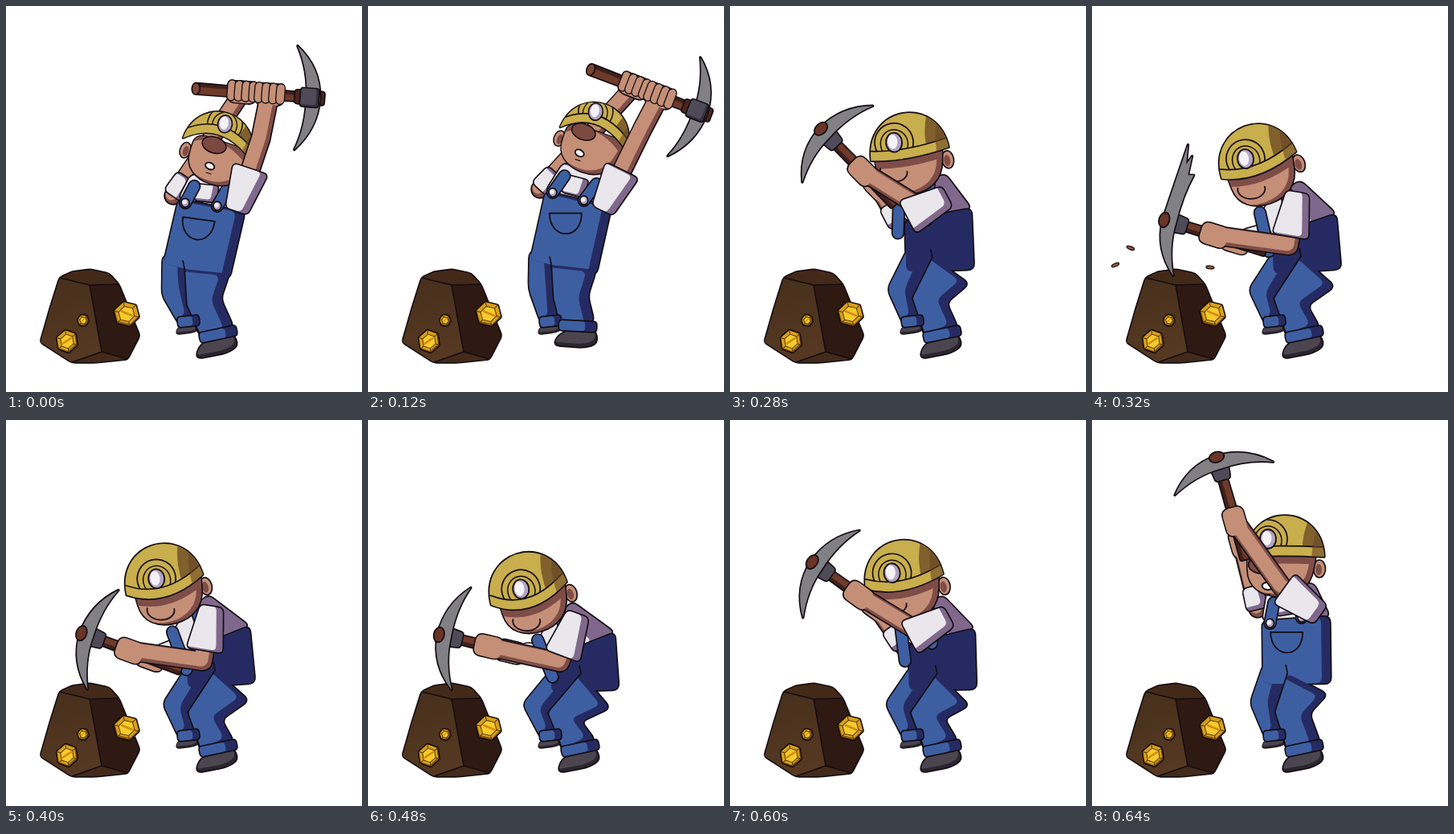
Recreate the animation shown at these times as an HTML page with a canvas. Size 443x480 px, loop 680 ms.

```html
<!DOCTYPE html>
<html lang="en">
<head>
<meta charset="utf-8">
<title>Miner</title>
<style>
html, body { margin: 0; width: 100%; height: 100%; overflow: hidden; background: #fff; }
canvas { display: block; width: 443px; height: 480px; }
</style>
</head>
<body>
<canvas id="stage" width="443" height="480"></canvas>
<script>
const c = document.getElementById('stage').getContext('2d');
const INK = '#140d12', EDGE = 3.4;
const BLUE = '#3d5fa2', NAVY = '#252b62', SKIN = '#c48f76', TAN = '#7f4d48';
const GOLD = '#c8ae4c', OCHRE = '#80602c', CLOTH = '#e9e6ec', MAUVE = '#80688c';
const WOOD = '#6e3a2a', STEEL = '#808085', IRON = '#4d4b58';

// Joints. head: x, y, tilt, look x, look y; foot: x, y, tilt; pick: angle, grip distance
const rest = {
  swing: 0, crouch: 0, head: [263, 176, 18, 18, -12], chest: [256, 248], hip: [250, 330], knee: [246, 368],
  foot: [261, 424, -12], shoulder: [287, 255], elbow: [317, 165], hand: [328, 110], pick: [4.5, 50]
};
const back = {
  ...rest, head: [281, 164, 20, 8, -13], chest: [262, 240], hip: [256, 325], knee: [252, 362],
  foot: [258, 414, 3], shoulder: [292, 254], elbow: [342, 152], hand: [363, 112], pick: [21, 50]
};
const high = {
  ...rest, head: [237, 163, 2, 0, -3], chest: [254, 247], hip: [268, 328], knee: [249, 364],
  foot: [256, 412, 4], shoulder: [284, 242], elbow: [270, 140], hand: [277, 91], pick: [6.3, 60]
};
const lift = {
  ...high, swing: 1, head: [240, 168, 0, -3, 2], foot: rest.foot,
  elbow: [236, 207], hand: [178, 126], pick: [-106, 63]
};
const hit = {
  ...rest, swing: 1, crouch: 1, head: [207, 196, -20, 5, 11], chest: [264, 272], hip: [281, 330], knee: [247, 368],
  shoulder: [256, 232], elbow: [245, 298], hand: [152, 285], pick: [-163, 45]
};
const dig = { ...hit, head: [197, 203, -15, 10, 14], elbow: [245, 300], hand: [154, 287], pick: [-160, 44] };
const sink = {
  ...hit, head: [201, 219, -18, 10, 17], chest: [270, 284], hip: [284, 340], knee: [243, 370],
  shoulder: [264, 246], elbow: [236, 302], hand: [148, 279], pick: [-170, 43]
};

const lerp = (a, b, t) => a.map((v, i) => v + (b[i] - v) * t);
const shift = (p, dx, dy) => [p[0] + dx, p[1] + dy];
function mix(a, b, t) {
  const out = {};
  for (const k in a) out[k] = Array.isArray(a[k]) ? lerp(a[k], b[k], t) : (t < .5 ? a : b)[k];
  return out;
}

// Start time and the pose held from then on
const steps = [
  [0, rest], [80, mix(rest, back, .5)], [120, back], [200, high],
  [240, mix(high, lift, .45)], [280, mix(lift, hit, .5)],
  [320, { ...hit, smear: 1, spread: 1 }], [360, { ...mix(hit, dig, .5), spread: 1.1 }],
  [400, dig], [440, mix(dig, sink, 1 / 3)], [480, mix(dig, sink, 2 / 3)], [520, sink],
  [600, mix(sink, lift, .4)], [640, lift]
];

function stroke(w = 1.7, color = INK) {
  c.lineWidth = w; c.strokeStyle = color; c.stroke();
}
function fill(color) { c.fillStyle = color; c.fill(); }
function local(x, y, deg, draw) {
  c.save(); c.translate(x, y); c.rotate(deg * Math.PI / 180); draw(); c.restore();
}
// Closed outline with rounded corners
function trace(pts, r) {
  const n = pts.length;
  const toward = (a, b) => {
    const d = Math.hypot(b[0] - a[0], b[1] - a[1]) || 1;
    return lerp(a, b, Math.min(r, d / 2) / d);
  };
  c.beginPath();
  pts.forEach((v, i) => {
    c.lineTo(...toward(v, pts[(i + n - 1) % n]));
    c.quadraticCurveTo(...v, ...toward(v, pts[(i + 1) % n]));
  });
  c.closePath();
}
// Shaded fill: the light copy is shifted inside the dark shape
function paint(pts, r, light, dark, dx, dy) {
  c.save();
  trace(pts, r); fill(dark); c.clip();
  c.translate(-dx, -dy); trace(pts, r); fill(light);
  c.restore();
}
function part(pts, r, light, dark = light, dx = 0, dy = 0) {
  trace(pts, r); stroke(EDGE);
  paint(pts, r, light, dark, dx, dy);
}
const box = (w, h) => [[-w, -h], [w, -h], [w, h], [-w, h]];
function oval(x, y, rx, ry, color, edge = 1.7, deg = 0) {
  c.beginPath(); c.ellipse(x, y, rx, ry, deg * Math.PI / 180, 0, 7);
  fill(color);
  if (edge) stroke(edge);
}
function line(pts, w, color = INK) {
  c.beginPath();
  pts.forEach(p => c.lineTo(...p));
  stroke(w, color);
}

// Left and right edge of a band along a path
function edges(path, widths) {
  const left = [], right = [];
  path.forEach((p, i) => {
    const a = path[Math.max(i - 1, 0)], b = path[Math.min(i + 1, path.length - 1)];
    const d = Math.hypot(b[0] - a[0], b[1] - a[1]) || 1, w = widths[i] / 2;
    const nx = (b[1] - a[1]) / d * w, ny = (a[0] - b[0]) / d * w;
    left.push(shift(p, -nx, -ny));
    right.push(shift(p, nx, ny));
  });
  return { left, right, all: [...left, ...right.slice().reverse()] };
}
const band = (path, widths) => edges(path, widths).all;
function along(a, b, len) {
  return lerp(a, b, len / (Math.hypot(b[0] - a[0], b[1] - a[1]) || 1));
}

function gem(x, y, r, deg, squash) {
  local(x, y, deg, () => {
    c.scale(squash, 1);
    const ring = k => Array.from({ length: 6 }, (_, i) => {
      const a = i * Math.PI / 3;
      return [r * k * Math.cos(a), r * k * Math.sin(a)];
    });
    const outer = ring(1), inner = ring(.65);
    part(outer, 1, '#d9a018', '#86560e', 2, 1);
    outer.forEach((p, i) => line([p, inner[i]], 1, '#57360b'));
    trace(inner, 0); fill('#f5cb2b'); stroke(1, '#57360b');
    line([[-r * .3, r * .3], [r * .25, -r * .4]], r * .18, '#d38c16');
  });
}
function rock() {
  const left = [67, 338], mid = [104, 347], right = [140, 346], foot = [119, 430];
  const base = [82, 443], west = [43, 418], east = [166, 410], tail = [151, 439];
  const top = [left, [82, 331], [105, 328], [128, 333], right];
  part([...top, east, tail, [112, 443], base, west, [55, 376]], 4, '#2f1913');
  const g = c.createLinearGradient(70, 340, 95, 440);
  g.addColorStop(0, '#47301c'); g.addColorStop(1, '#573922');
  trace([left, mid, foot, base, west, [55, 376]], 2); fill(g);
  trace([...top, mid], 3); fill('#432918');
  trace([foot, tail, [112, 443], base], 2); fill('#432a1a');
  line([left, mid, right], 1.4);
  line([mid, foot, base], 1.5);
  line([foot, tail], 1.3);
  gem(76, 417, 14, 20, .95);
  gem(96, 391, 7, 10, .95);
  gem(150, 383, 16, 75, .95);
}

function head(x, y, tilt, lx, ly, earRight, open) {
  local(x, y, tilt, () => {
    const k = 1 + Math.min(ly, 0) * .008, brim = -3 + 1.3 * ly, side = earRight ? 1 : -1;
    c.scale(k, k);
    const ear = earRight ? 42 + ly * .5 : -48 + lx * .4;
    oval(ear, 17, 7.5, 11, SKIN);
    oval(ear - side, 18, 4, 7, TAN, 0);
    const face = [[-45, -8], [-44, 34], [-22, 51], [12, 51], [34, 34], [42, -8]].map(p => shift(p, lx * .6, Math.min(ly, 0) * .1));
    part(face, 16, SKIN, TAN, 6, 3);

    const brimLine = lift => {
      c.moveTo(-49, 2 - lift);
      c.quadraticCurveTo(-6, 2 * brim - lift, 49, 2 - lift);
    };
    c.save();
    trace(face, 16); c.clip();
    c.beginPath(); brimLine(-4); stroke(12, TAN);
    c.restore();
    if (open) {
      oval(-19 + lx * .95, 37 + ly * .8, 6.5, 4.5, '#fff', 2, 8);
      line([[-22 + lx, 47 + ly * .8], [-15 + lx, 47 + ly * .8]], 1.3);
    } else {
      c.beginPath(); c.ellipse(-25 + lx * 1.2, 11 + ly * 1.45, 17, 12, .3, -.2, 3.3);
      stroke(1.8);
    }

    const dome = () => {
      c.beginPath(); c.moveTo(49, 2);
      c.bezierCurveTo(46, -66, -46, -66, -49, 2);
      c.quadraticCurveTo(-6, 2 * brim, 49, 2); c.closePath();
    };
    dome(); stroke(EDGE); fill(GOLD);
    c.save();
    c.clip();
    c.beginPath(); c.ellipse(62, -12, 40, 66, .12, 0, 7); fill(OCHRE);
    const px = -18 + lx, py = -22 + ly;
    oval(px, py, 24, 24, GOLD, 1.7);
    oval(px, py + 2, 17, 18, GOLD, 1.5);
    c.beginPath(); brimLine(6); stroke(13.5);
    c.beginPath(); brimLine(5.5); stroke(11, GOLD);
    c.beginPath(); c.ellipse(66, -5, 32, 60, .12, 0, 7); fill('rgba(105,70,35,.6)');
    c.restore();
    oval(px, py, 10, 12, '#b3a4c3', 1.8, -tilt * .6);
    oval(px - 1.5, py - 1, 6, 9, '#f5f2f7', 0, -tilt * .6);
    if (open) oval(-25 + lx * 1.1, 10 + ly, 17, 11, '#7c4941', 1.7);
  });
}

function blade(dx, smear) {
  c.beginPath();
  c.moveTo(-20 + dx, -63);
  c.quadraticCurveTo(11 + dx, -38, 13 + dx, 0);
  if (smear) {
    c.quadraticCurveTo(12 + dx, 40, 19, 98);
    [[14, 74], [10, 86], [8, 62], [1, 64]].forEach(p => c.lineTo(...p));
  } else {
    c.quadraticCurveTo(13 + dx, 38, -14 + dx, 66);
  }
  c.quadraticCurveTo(-2 + dx, 36, -4 + dx, 0);
  c.quadraticCurveTo(-4 + dx, -32, -20 + dx, -63);
  c.closePath();
  stroke(EDGE); fill(STEEL);
}
function tool(front, smear) {
  const len = front ? 112 : 142;
  part([[-len, -6.5], [-2, -5.5], [-2, 5.5], [-len, 6.5]], 2, WOOD, '#3f201b', 0, -4);
  if (front) {
    part([[-9, -9], [6, -11], [6, 11], [-9, 9]], 3, IRON);
    blade(9, smear);
    oval(20, 0, 6.5, 9.5, '#6a3426', 1.8);
  } else {
    oval(-len, 0, 5, 7.5, '#7c4534');
    part(box(18, 8), 3, '#4a251d');
    blade(0);
    part(box(11, 11), 3, IRON, '#33313c', 3, 2);
  }
}

function arm(path, w, deg, fingers) {
  const fist = (color, grow) => local(...path[0], deg, () => {
    trace(box(17, 13), 9);
    if (grow) stroke(grow);
    fill(color);
  });
  line(path, w + EDGE);
  fist(SKIN, EDGE);
  line(path, w, TAN);
  fist(SKIN, 0);
  line(path.map(p => shift(p, -2, -2)), w - 5, SKIN);
  if (fingers) local(...path[0], deg, () => {
    for (let x = -13.5; x < 16; x += 9) {
      line([[x, -9], [x, 6]], 12);
      line([[x, -9], [x, 6]], 9.4, SKIN);
    }
  });
}
function sleeve(from, to, len, w0, w1) {
  part(band([from, along(from, to, len)], [w0, w1]), 6, CLOTH, MAUVE, 8, 3);
}
function shoe(x, y, deg, k) {
  local(x, y, deg, () => {
    c.scale(k, k);
    part([[-27, 9], [-20, -5], [0, -13], [24, -13], [28, 4], [12, 10]], 9, '#4b454f', '#2a252f', 2, 4);
  });
}
function cuff(p, deg, w) {
  local(...p, deg, () => part(box(w, 6), 4, BLUE, NAVY, w * .6, 0));
}

function straps(neck, chest, crouch) {
  const top = lerp(neck, chest, crouch ? .05 : .4), turn = crouch ? -22 : 0;
  const d = Math.hypot(chest[0] - neck[0], chest[1] - neck[1]);
  const ux = (chest[1] - neck[1]) / d, uy = (neck[0] - chest[0]) / d;
  for (const [a, b] of [[17, 7], [-24, -33]]) {
    const from = shift(top, ux * (a + turn / 2), uy * (a + turn / 2));
    const to = shift(chest, ux * (b + turn), uy * (b + turn));
    line([from, to], 13 + EDGE);
    line([from, to], 13, BLUE);
    if (!crouch) {
      oval(...to, 5, 5.5, '#a79bb5');
      oval(to[0] - 1, to[1] - 1, 3, 3, '#eeeaf0', 0);
    }
  }
}

function miner(p) {
  const [deg, grip] = p.pick, a = deg * Math.PI / 180;
  const reach = d => shift(p.hand, Math.cos(a) * d, Math.sin(a) * d);
  const neck = lerp(p.head, p.chest, .5), pelvis = shift(p.hip, -13, 0);
  const farHand = reach(p.swing ? -28 : -34), farShoulder = shift(p.chest, -48, p.crouch ? 12 : -12);
  const [fx, fy, tilt] = p.foot, ankle = [fx + 3, fy - 16], farAnkle = [227, 392];

  arm([farHand, farShoulder], 20, deg, !p.swing);
  sleeve(farShoulder, farHand, 28, 26, 24);
  shoe(226, 401, -8, .58);
  shoe(fx, fy, tilt, 1);

  const spine = edges([neck.slice(0, 2), p.chest, pelvis], [58, 84, 84]);
  const slab = (i, j) => [spine.left[i], spine.left[j], spine.right[j], spine.right[i]];
  part(slab(0, 1), 8, CLOTH, MAUVE, p.crouch ? 28 : 8, p.crouch ? -10 : 0);

  const farLeg = band([shift(p.hip, -39, -20), shift(p.knee, -34, -12), farAnkle], [32, 36, 24]);
  const leg = edges([p.hip, p.knee, ankle], [56, 43, 42]);
  const torso = slab(1, 2);
  for (const shape of [farLeg, torso, leg.all]) { trace(shape, 8); stroke(EDGE); }
  paint(farLeg, 8, BLUE, NAVY, 15, 3);
  paint(torso, 8, p.crouch ? NAVY : BLUE, NAVY, 11, 0);
  paint(leg.all, 8, BLUE, NAVY, 12, p.crouch ? 4 : -2);
  line([shift(leg.left[0], -2, -10), ...leg.left], 1.7);
  cuff(farAnkle, -6, 13);
  cuff(ankle, tilt, 23);

  if (!p.crouch) {
    part(band([lerp(neck, p.chest, .3), lerp(neck, p.chest, .85)], [30, 26]).map(q => shift(q, -9, 0)), 4, CLOTH, MAUVE, 6, 3);
    local(...shift(lerp(p.chest, pelvis, .22), -12, 0), tilt < 0 && !p.swing ? 8 : 0, () => {
      c.beginPath(); c.moveTo(-20, -1); c.lineTo(20, -1);
      c.bezierCurveTo(20, 34, -20, 32, -20, -1);
      stroke(1.8);
    });
  }
  straps(neck, p.chest, p.crouch);

  head(...p.head, p.swing, !p.crouch);
  local(...reach(grip), deg, () => tool(p.swing, p.smear));
  if (!p.swing) arm([farHand, farHand], 10, deg, true);
  arm([p.hand, p.elbow, lerp(p.elbow, p.shoulder, .5)], 22, deg, !p.swing);
  sleeve(p.shoulder, p.elbow, 55, 28, 45);
}

function chips(k) {
  for (const [x, y, deg] of [[29, 322, -25], [48, 301, 20], [147, 325, 5]]) {
    oval(105 + (x - 105) * k, y + (k - 1) * 60, 5, 2, '#9a552c', 1.2, deg * k);
  }
}

function draw(now) {
  const pose = steps.filter(s => s[0] <= now % 680).pop()[1];
  c.fillStyle = '#fff';
  c.fillRect(0, 0, 443, 480);
  c.lineJoin = c.lineCap = 'round';
  rock();
  miner(pose);
  if (pose.spread) chips(pose.spread);
}

let start;
function tick(now) {
  start ??= now;
  draw(now - start);
  requestAnimationFrame(tick);
}
draw(0);
requestAnimationFrame(tick);
</script>
</body>
</html>
```
